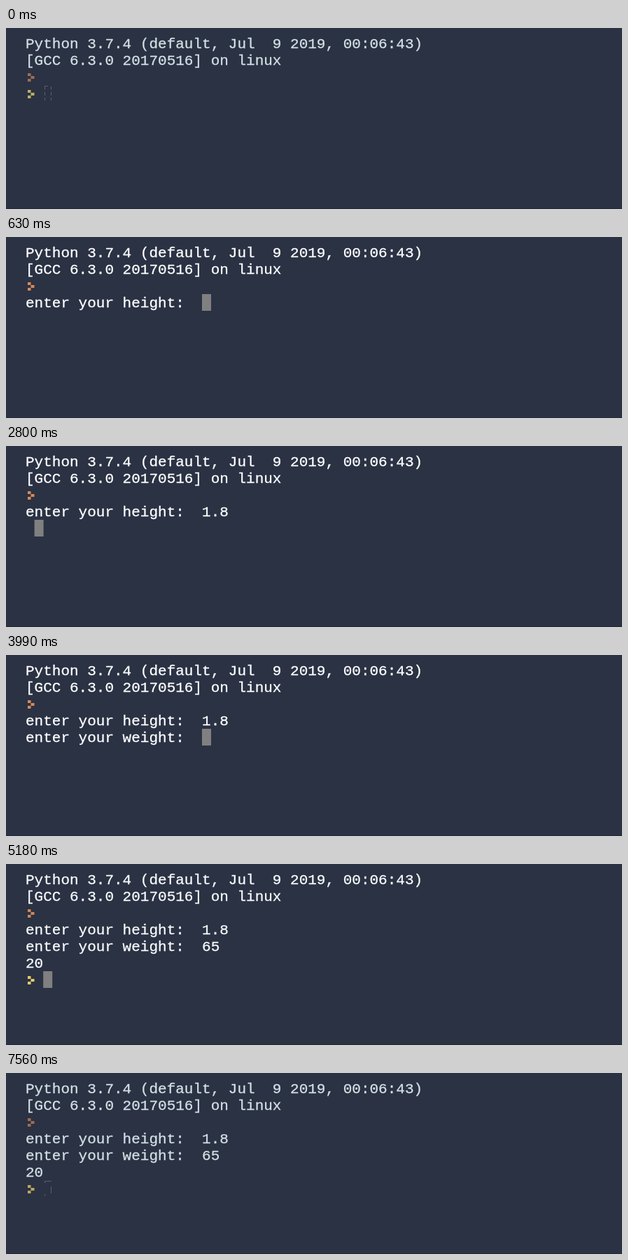
Write an HTML page that moves like this. It is 880 by 260 pixels and loops after 7630 ms.

```html
<!DOCTYPE html>
<html lang="en">
<head>
<meta charset="utf-8">
<title>Python console</title>
<style>
  html, body { margin: 0; width: 100%; height: 100%; overflow: hidden; background: #2a3244; }
  svg { display: block; width: 880px; height: 260px; }
  svg * { animation-duration: 7630ms; animation-iteration-count: infinite; animation-timing-function: step-end; }
  text {
    font: 21px "Liberation Mono", "Courier New", monospace;
    white-space: pre;
    fill: currentColor;
    stroke: currentColor;
    stroke-width: .3px;
  }
  .prompt { fill: currentColor; }
  .hollow { fill: none; stroke: #596069; stroke-width: 1; shape-rendering: crispEdges; }
  .idle { color: #bbae68; animation-name: idle; }
  .done { animation-name: done; }
  .blur { animation-name: blur; }

  /* Focus fades: dim, bright while running, dim again */
  .ink, .orange, .yellow { animation-timing-function: ease; }
  .ink { animation-name: ink; }
  .orange { animation-name: orange; }
  .yellow { animation-name: yellow; }
  @keyframes ink { 0%, .4%, 72%, to { color: #d3e0e4 } 5.6%, 67.3% { color: #fff } }
  @keyframes orange { 0%, .4%, 72%, to { color: #a06d54 } 5.6%, 67.3% { color: #d88a57 } }
  @keyframes yellow { 0%, 67.3% { color: #e8d06c } 72%, to { color: #bba760 } }

  /* Typing and output */
  .ask1 { animation-name: ask1; }
  .h1 { animation-name: h1; }
  .h2 { animation-name: h2; }
  .h3 { animation-name: h3; }
  .ask2 { animation-name: ask2; }
  .w1 { animation-name: w1; }
  .w2 { animation-name: w2; }
  @keyframes idle { 0% { visibility: visible } .91%, to { visibility: hidden } }
  @keyframes ask1 { 0% { visibility: hidden } 7.33%, to { visibility: visible } }
  @keyframes h1 { 0% { visibility: hidden } 23.85%, to { visibility: visible } }
  @keyframes h2 { 0% { visibility: hidden } 27.52%, to { visibility: visible } }
  @keyframes h3 { 0% { visibility: hidden } 31.19%, to { visibility: visible } }
  @keyframes ask2 { 0% { visibility: hidden } 40.36%, to { visibility: visible } }
  @keyframes w1 { 0% { visibility: hidden } 54.12%, to { visibility: visible } }
  @keyframes w2 { 0% { visibility: hidden } 57.79%, to { visibility: visible } }
  @keyframes done { 0% { visibility: hidden } 66.05%, to { visibility: visible } }
  @keyframes blur { 0% { visibility: hidden } 68.8%, to { visibility: visible } }

  .cursor { fill: #808080; shape-rendering: crispEdges; animation-name: focus, move; }
  @keyframes focus { 0%, 68.8%, to { visibility: hidden } .91% { visibility: visible } }
  /* One column is 12.6px, one row 24px */
  @keyframes move {
    0% { transform: translate(12.6px, 0) }
    7.33% { transform: translate(252px, 0) }
    23.85% { transform: translate(264.6px, 0) }
    27.52% { transform: translate(277.2px, 0) }
    31.19% { transform: translate(289.8px, 0) }
    36.69% { transform: translate(12.6px, 24px) }
    40.36% { transform: translate(252px, 24px) }
    54.12% { transform: translate(264.6px, 24px) }
    57.79% { transform: translate(277.2px, 24px) }
    62.38% { transform: translate(12.6px, 48px) }
    66.05%, to { transform: translate(25.2px, 72px) }
  }
</style>
</head>
<body>
<svg viewBox="0 0 880 260">
  <defs>
    <path id="chevron" d="M31 -6h4.5v4h-4.5zM35.5 -2h5v4h-5zM31 2h4.5v4h-4.5z"/>
  </defs>
  <rect width="880" height="260" fill="#2a3244"/>
  <rect y="259" width="880" height="1" fill="#20283a"/>

  <rect class="cursor" x="28.4" y="82" width="12.6" height="24"/>

  <g class="ink">
    <text x="28" y="29">Python 3.7.4 (default, Jul  9 2019, 00:06:43)</text>
    <text x="28" y="53">[GCC 6.3.0 20170516] on linux</text>
    <text x="28" y="101" class="ask1">enter your height:  <tspan class="h1">1</tspan><tspan class="h2">.</tspan><tspan class="h3">8</tspan></text>
    <text x="28" y="125" class="ask2">enter your weight:  <tspan class="w1">6</tspan><tspan class="w2">5</tspan></text>
    <text x="28" y="149" class="done">20</text>
  </g>

  <g class="orange"><use href="#chevron" y="71" class="prompt"/></g>

  <g class="idle">
    <use href="#chevron" y="95" class="prompt"/>
    <path class="hollow" d="M55 83.5h5M55.5 84v20M64.5 84v20" stroke-dasharray="5 3"/>
  </g>

  <g class="yellow">
    <g class="done"><use href="#chevron" y="167" class="prompt"/></g>
  </g>
  <path class="hollow blur" d="M55.5 158v-2.5h9M64.5 163v10M55.5 174v3"/>
</svg>
</body>
</html>
```
